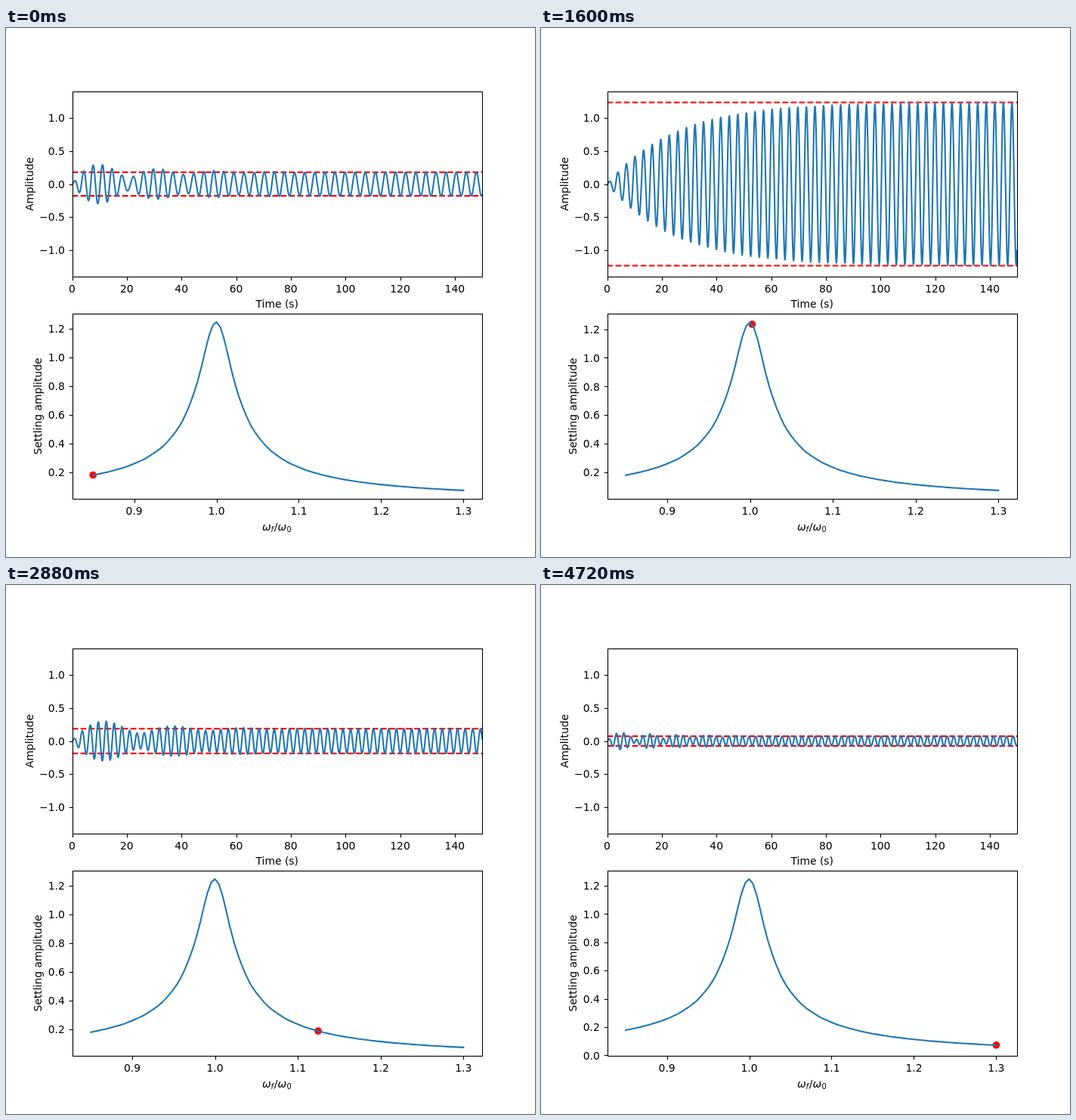
An HTML page for the animation above (4800 ms loop, 700 px wide and 700 px high).

```html
<!DOCTYPE html>
<html lang="en">
<head>
<meta charset="utf-8">
<title>Driven oscillator resonance</title>
<style>
  html, body { margin: 0; width: 100%; height: 100%; overflow: hidden; background: #fff; }
  svg { display: block; width: 700px; height: 700px; }
  text { font: 13.889px "DejaVu Sans", sans-serif; fill: #000; }
  .mid { text-anchor: middle; }
  .end { text-anchor: end; }
  .it { font-style: italic; }
  .sub { font-size: 9.722px; }
  .axis { fill: none; stroke: #000; stroke-width: 1.111; }
  .line { fill: none; stroke: #1f77b4; stroke-width: 2.083; stroke-linejoin: round; stroke-linecap: square; }
  .level { stroke: #f00; stroke-width: 2.083; stroke-dasharray: 7.708 3.333; }
</style>
</head>
<body>
<svg viewBox="0 0 700 700">
  <clipPath id="clipTop"><rect x="87.5" y="84" width="542.5" height="245"/></clipPath>
  <clipPath id="clipLow"><rect x="87.5" y="378" width="542.5" height="245"/></clipPath>

  <g clip-path="url(#clipTop)">
    <line class="level" id="upper" x1="87.5" x2="630"/>
    <line class="level" id="lower" x1="87.5" x2="630"/>
    <path class="line" id="wave"/>
  </g>
  <g clip-path="url(#clipLow)">
    <circle id="dot" r="4.86" fill="#f00"/>
    <path class="line" id="curve"/>
  </g>

  <rect class="axis" x="88.5" y="84.5" width="542" height="245"/>
  <rect class="axis" x="88.5" y="378.5" width="542" height="245"/>
  <g id="ticksTop"></g>
  <g id="ticksLow"></g>

  <text class="mid" x="358.75" y="370">Time (s)</text>
  <text class="mid" transform="translate(36 206.5) rotate(-90)">Amplitude</text>
  <text class="mid" transform="translate(47 500.5) rotate(-90)">Settling amplitude</text>
  <text class="it" x="339" y="665">ω</text>
  <text class="it sub" x="350.6" y="667.3">f</text>
  <text x="354.8" y="665">/</text>
  <text class="it" x="359.5" y="665">ω</text>
  <text class="sub" x="371.4" y="667.3">0</text>
</svg>
<script>
const STEPS = 60, STEP_MS = 80;
const W0 = 2, GAMMA = 0.08, FORCE = 0.2, T_END = 150;
const R_MIN = 0.85, R_MAX = 1.3;
const LEFT = 87.5, WIDTH = 542.5, HEIGHT = 245;
const PAD = 3; // marker extent counted by the axis limits, in px

const el = id => document.getElementById(id);
const linspace = (a, b, n) => Array.from({ length: n }, (_, i) => a + (b - a) * i / (n - 1));
const snap = v => Math.floor(v + 0.5) + 0.5;
const label = v => v.toFixed(1).replace('-', '\u2212');

// Displacement from rest under FORCE * cos(ratio * W0 * t)
function oscillator(ratio) {
  const w = ratio * W0, d = GAMMA / 2, wd = Math.sqrt(W0 * W0 - d * d);
  const re = W0 * W0 - w * w, im = GAMMA * w;
  const amp = FORCE / Math.hypot(re, im), lag = Math.atan2(im, re);
  const c = -amp * Math.cos(lag);
  const s = (d * c - amp * w * Math.sin(lag)) / wd;
  return t => amp * Math.cos(w * t - lag)
    + Math.exp(-d * t) * (c * Math.cos(wd * t) + s * Math.sin(wd * t));
}

const lateTimes = linspace(140, T_END, 1000);
const settle = ratio => Math.max(...lateTimes.map(oscillator(ratio)));

// Linear data-to-pixel scales for one panel
function panel(x0, x1, y0, y1, bottom) {
  return {
    x: v => LEFT + WIDTH * (v - x0) / (x1 - x0),
    y: v => bottom - HEIGHT * (v - y0) / (y1 - y0),
    bottom, y0
  };
}

const pathOf = (p, xs, ys) =>
  'M' + xs.map((x, i) => p.x(x).toFixed(2) + ' ' + p.y(ys[i]).toFixed(2)).join('L');

function ticks(p, xs, ys, xLabel) {
  const b = p.bottom + 0.5;
  return xs.map(v => {
    const x = p.x(v);
    return `<path class="axis" d="M${snap(x)} ${b}v4.86"/>` +
      `<text class="mid" x="${x.toFixed(2)}" y="${p.bottom + 21}">${xLabel(v)}</text>`;
  }).join('') + ys.map(v => {
    const y = p.y(v);
    return `<path class="axis" d="M88.5 ${snap(y)}h-4.86"/>` +
      `<text class="end" x="77.8" y="${Math.round(y + 5.2)}">${label(v)}</text>`;
  }).join('');
}

const times = linspace(0, T_END, 1000);
const ratios = linspace(R_MIN, R_MAX, 100);
const response = ratios.map(settle);
const lowest = Math.min(...response), highest = Math.max(...response);
const padX = PAD * 1.1 * (R_MAX - R_MIN) / WIDTH;
const padY = PAD * 1.1 * (highest - lowest) / HEIGHT;

const top_ = panel(0, T_END, -1.4, 1.4, 329);
el('ticksTop').innerHTML =
  ticks(top_, [0, 20, 40, 60, 80, 100, 120, 140], [-1, -0.5, 0, 0.5, 1], String);

// Limits hold both the curve and the marker, plus a 5% margin
function limits(lo, hi, v, pad) {
  const a = Math.min(lo, v - pad), b = Math.max(hi, v + pad), m = (b - a) * 0.05;
  return [a - m, b + m];
}

function draw(step) {
  const ratio = R_MIN + (R_MAX - R_MIN) * step / (STEPS - 1);
  const amp = settle(ratio);

  el('wave').setAttribute('d', pathOf(top_, times, times.map(oscillator(ratio))));
  for (const [id, v] of [['upper', amp], ['lower', -amp]]) {
    el(id).setAttribute('y1', top_.y(v));
    el(id).setAttribute('y2', top_.y(v));
  }

  const low = panel(...limits(R_MIN, R_MAX, ratio, padX),
    ...limits(lowest, highest, amp, padY), 623);
  el('curve').setAttribute('d', pathOf(low, ratios, response));
  el('dot').setAttribute('cx', low.x(ratio));
  el('dot').setAttribute('cy', low.y(amp));
  el('ticksLow').innerHTML = ticks(low, [0.9, 1, 1.1, 1.2, 1.3],
    [0, 0.2, 0.4, 0.6, 0.8, 1, 1.2].filter(v => v >= low.y0), label);
}

let shown = -1;
const start = performance.now();
function tick() {
  const step = Math.floor((performance.now() - start) / STEP_MS) % STEPS;
  if (step !== shown) draw(shown = step);
  requestAnimationFrame(tick);
}
tick();
</script>
</body>
</html>
```
